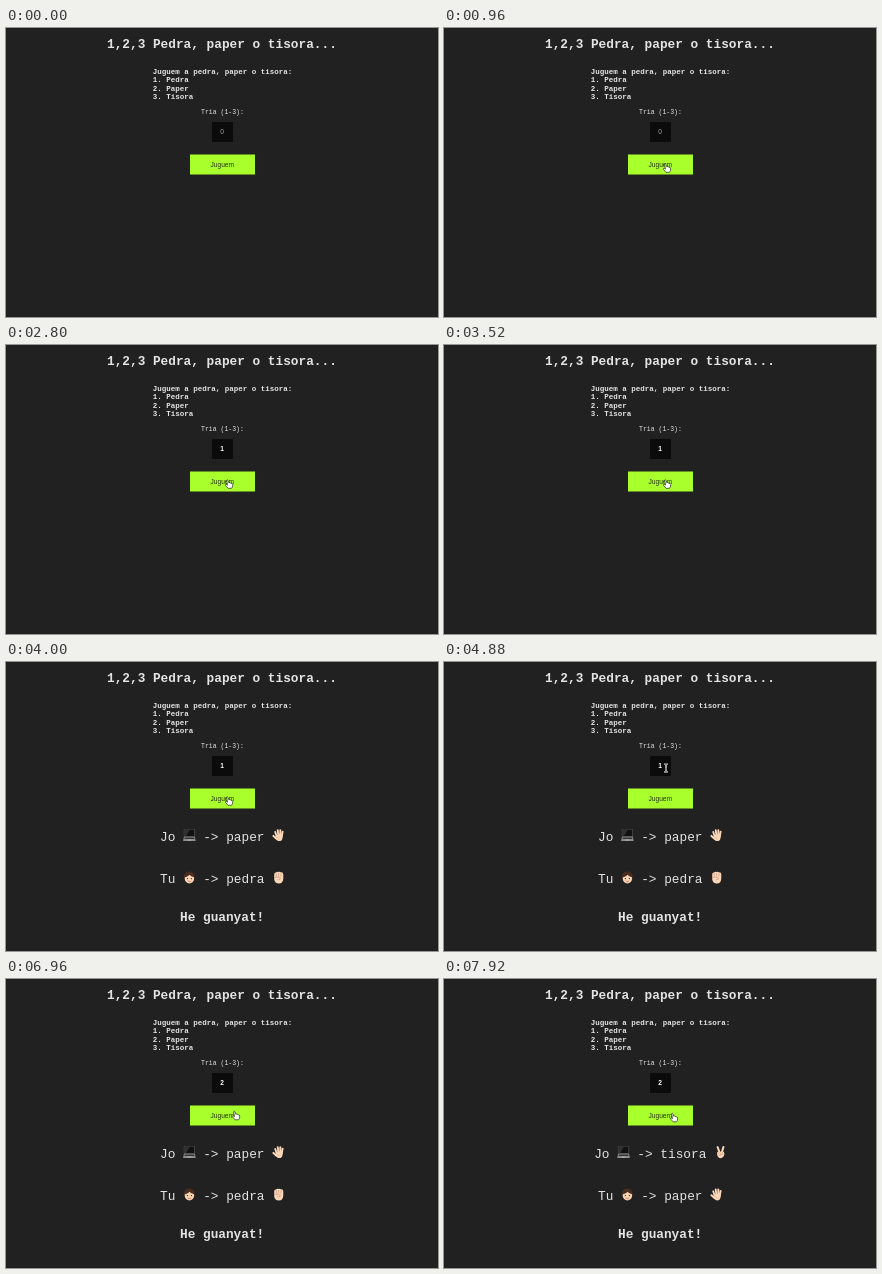
These frames come from a looping animation (432 by 289 pixels, 8 s). An HTML page:

```html
<!DOCTYPE html>
<html lang="ca">
<head>
<meta charset="utf-8">
<title>Pedra, paper o tisora</title>
<style>
  html, body { margin: 0; width: 100%; height: 100%; overflow: hidden; background: #212121; }
  svg { display: block; width: 100vw; height: 100vh; }
  text { font-family: "Liberation Mono", "Courier New", monospace; fill: #e4e4e4; white-space: pre; }
  .big { font-size: 12.78px; }
  .rules { font-size: 7.5px; }
  .bold { font-weight: bold; }
  .ui { font-family: "Liberation Sans", Arial, sans-serif; font-size: 6.6px; text-anchor: middle; }
</style>
</head>
<body>
<svg viewBox="0 0 432 289" preserveAspectRatio="none">
  <defs>
    <g id="laptop">
      <rect x=".8" y=".2" width="11.2" height="7.8" rx=".6" fill="#555"/>
      <rect x="1.5" y=".8" width="9.8" height="6.5" fill="#111"/>
      <path d="M1.5 .8H7L3 7.3H1.5Z" fill="#303030"/>
      <path d="M.9 8H11.9L12.7 12.3H.1Z" fill="#8c8c8c"/>
      <path d="M1.8 8.7H11L11.5 10.4H1.3Z" fill="#333"/>
      <path d="M4.6 10.9H8.2L8.5 12H4.3Z" fill="#aaa"/>
    </g>
    <g id="person">
      <path d="M1.2 8C.2 3.6 2.4 .7 6.3 .6S12.4 3.4 11.4 8Z" fill="#4a2d20"/>
      <ellipse cx="6.4" cy="7.6" rx="4.7" ry="4.9" fill="#f8d5b5"/>
      <path d="M1.4 6.4C2 2.7 4 1.6 6.6 1.7S11 3.2 11.3 6.2C9 5.8 7.4 4.8 6.5 3.7 5.2 5.1 3.5 6 1.4 6.4Z" fill="#4a2d20"/>
      <circle cx="4.4" cy="7.6" r=".65" fill="#35231c"/>
      <circle cx="8.4" cy="7.6" r=".65" fill="#35231c"/>
      <path d="M4.7 10Q6.4 11.4 8.1 10" fill="none" stroke="#b55f50" stroke-width=".7"/>
    </g>
    <g id="paper" fill="none" stroke="#fbd7ba" stroke-linecap="round">
      <path d="M3 3.3L4.6 8M5.5 1.4L6.2 7M8.1 1.5L8 7M10.4 3L9.5 8" stroke-width="1.9"/>
      <path d="M1.2 7.2L4.3 10" stroke-width="2"/>
      <path d="M3.8 6.5H10.3C10.7 10.5 9.5 12.4 7.3 12.4S4 11.4 3 9Z" fill="#fbd7ba" stroke="none"/>
      <path d="M4.5 8.5Q6.6 8.4 7 10.6" stroke="#d7a482" stroke-width=".5"/>
    </g>
    <g id="pedra">
      <path d="M2 3.2Q2 1.4 3.7 1.5 4.8 .3 6.2 1.1 7.7 .4 8.8 1.4 11 1.1 11.1 3.5L11 8Q10.6 12.5 6.6 12.5T2 8.5Z" fill="#fbd7ba"/>
      <path d="M4.1 2.2V5.6M6.4 2V5.4M8.7 2.2V5.6M2.3 6.5Q6.8 5.5 8.1 7T5.4 9" fill="none" stroke="#cc9877" stroke-width=".65"/>
    </g>
    <g id="tisora" fill="none" stroke="#fbd7ba" stroke-linecap="round">
      <path d="M3.5 1.4L5.6 7M9.4 1.2L7.7 7" stroke-width="2"/>
      <path d="M3 7Q3 5.7 5 6L9.7 6Q11 8 9.8 10.4 8.8 12.5 6.6 12.5 2.8 12.3 3 7Z" fill="#fbd7ba" stroke="none"/>
      <path d="M3.7 7.5Q6.5 6.3 7.3 8T5.2 9.7M8.6 7.1V9" stroke="#cc9877" stroke-width=".65"/>
    </g>
    <path id="arrow" d="M-3-5V4L-1 2.2 .5 5.4 2 4.7 .6 1.7H3.5Z" fill="#111" stroke="#fff" stroke-width=".7"/>
    <g id="beam" fill="none">
      <path d="M-1.8-4Q-.3-4 0-3Q.3-4 1.8-4M0-3V3M-1.8 4Q-.3 4 0 3Q.3 4 1.8 4M-1 1H1" stroke="#fff" stroke-width="1.7"/>
      <path d="M-1.8-4Q-.3-4 0-3Q.3-4 1.8-4M0-3V3M-1.8 4Q-.3 4 0 3Q.3 4 1.8 4M-1 1H1" stroke="#222" stroke-width=".6"/>
    </g>
    <path id="hand" d="M-2.4-3.8Q-1.6-4.8-1-3.6L-.3-1.3Q.6-1.9 1.1-1 2-1.5 2.4-.5 3.6-.8 3.7 .6L3.5 2.8 2.5 4.3H-.9L-3.6 1.2Q-3.7 .1-2.6 .4L-1.5 1.2Z" fill="#fff" stroke="#222" stroke-width=".7"/>
  </defs>

  <rect width="432" height="289" fill="#212121"/>
  <text class="big bold" x="101" y="19.5">1,2,3 Pedra, paper o tisora...</text>
  <g class="rules bold">
    <text x="146.7" y="45.5">Juguem a pedra, paper o tisora:</text>
    <text x="146.7" y="54">1. Pedra</text>
    <text x="146.7" y="62.5">2. Paper</text>
    <text x="146.7" y="71">3. Tisora</text>
  </g>
  <text x="195" y="86" font-size="6.5">Tria (1-3):</text>
  <rect x="206" y="94" width="21" height="20" fill="#0b0b0b"/>
  <text id="value" class="ui" x="216.2" y="106.4"></text>
  <rect id="caret" x="218.8" y="100" width=".7" height="8.5" fill="#ddd"/>
  <rect x="184" y="126.5" width="65" height="20" fill="#a8ff2b"/>
  <text class="ui" x="216.3" y="138.6" style="fill:#263313">Juguem</text>

  <g id="results">
    <g id="mine"></g>
    <g id="yours"></g>
    <text class="big bold" x="174" y="258.7">He guanyat!</text>
  </g>
  <use id="cursor"/>
</svg>
<script>
  const LOOP = 8000, STEP = 80, CHAR = 7.67;
  const $ = id => document.getElementById(id);

  // time, x, y of the pointer
  const path = [
    [480, 228, 175], [560, 228, 169], [720, 228, 167], [1040, 222, 135], [1440, 220, 103],
    [2160, 220, 103], [2560, 223, 139], [3840, 223, 139], [4640, 223, 139],
    [4880, 222, 106], [5280, 223.5, 106], [6640, 223.5, 106], [6960, 230, 136.5],
    [7840, 230, 136.5], [7920, 230, 138.5]
  ];
  // time, text, colour, weight
  const values = [
    [0, "0", "#aaa", 400], [1760, "0", "#777", 400], [2160, "1", "#fff", 700], [6720, "2", "#fff", 700]
  ];
  const rounds = [[0], [3680, "paper", "pedra"], [7200, "tisora", "paper"]];

  const latest = (table, t) => table.filter(row => row[0] <= t).pop();

  function pointerAt(t) {
    const i = path.findIndex(p => p[0] > t);
    if (i === 0) return null;
    if (i < 0) return path[path.length - 1].slice(1);
    const [a, b] = [path[i - 1], path[i]];
    const k = (t - a[0]) / (b[0] - a[0]);
    const eased = k * k * (3 - 2 * k);
    return [1, 2].map(n => a[n] + (b[n] - a[n]) * eased);
  }

  function pointerShape(y) {
    if (y >= 94 && y <= 114) return "beam";
    return y >= 126 && y <= 146 ? "hand" : "arrow";
  }

  function resultLine(who, icon, move, y) {
    const x = 154 - (move.length - 5) * CHAR / 2;
    const end = x + 43.2 + (move.length + 4) * CHAR;
    const top = y - 12.3;
    return `<text class="big" x="${x}" y="${y}">${who}</text>
      <use href="#${icon}" x="${x + 23}" y="${top}"/>
      <text class="big" x="${x + 43.2}" y="${y}">-&gt; ${move}</text>
      <use href="#${move}" x="${end}" y="${top}"/>`;
  }

  let shownRound;
  function showRound(round) {
    if (round === shownRound) return;
    shownRound = round;
    const [, mine, yours] = round;
    $("results").style.display = mine ? "" : "none";
    if (!mine) return;
    $("mine").innerHTML = resultLine("Jo", "laptop", mine, 179);
    $("yours").innerHTML = resultLine("Tu", "person", yours, 221.3);
  }

  function render(t) {
    const [, text, colour, weight] = latest(values, t);
    $("value").textContent = text;
    $("value").style.fill = colour;
    $("value").style.fontWeight = weight;
    $("caret").style.display = t >= 5200 && t < 5680 ? "" : "none";
    showRound(latest(rounds, t));

    const point = pointerAt(t);
    $("cursor").style.display = point ? "" : "none";
    if (point) {
      $("cursor").setAttribute("href", "#" + pointerShape(point[1]));
      $("cursor").setAttribute("transform", `translate(${point})`);
    }
  }

  const start = performance.now();
  function tick() {
    const t = (performance.now() - start) % LOOP;
    render(Math.floor(t / STEP) * STEP);
    requestAnimationFrame(tick);
  }
  tick();
</script>
</body>
</html>
```
